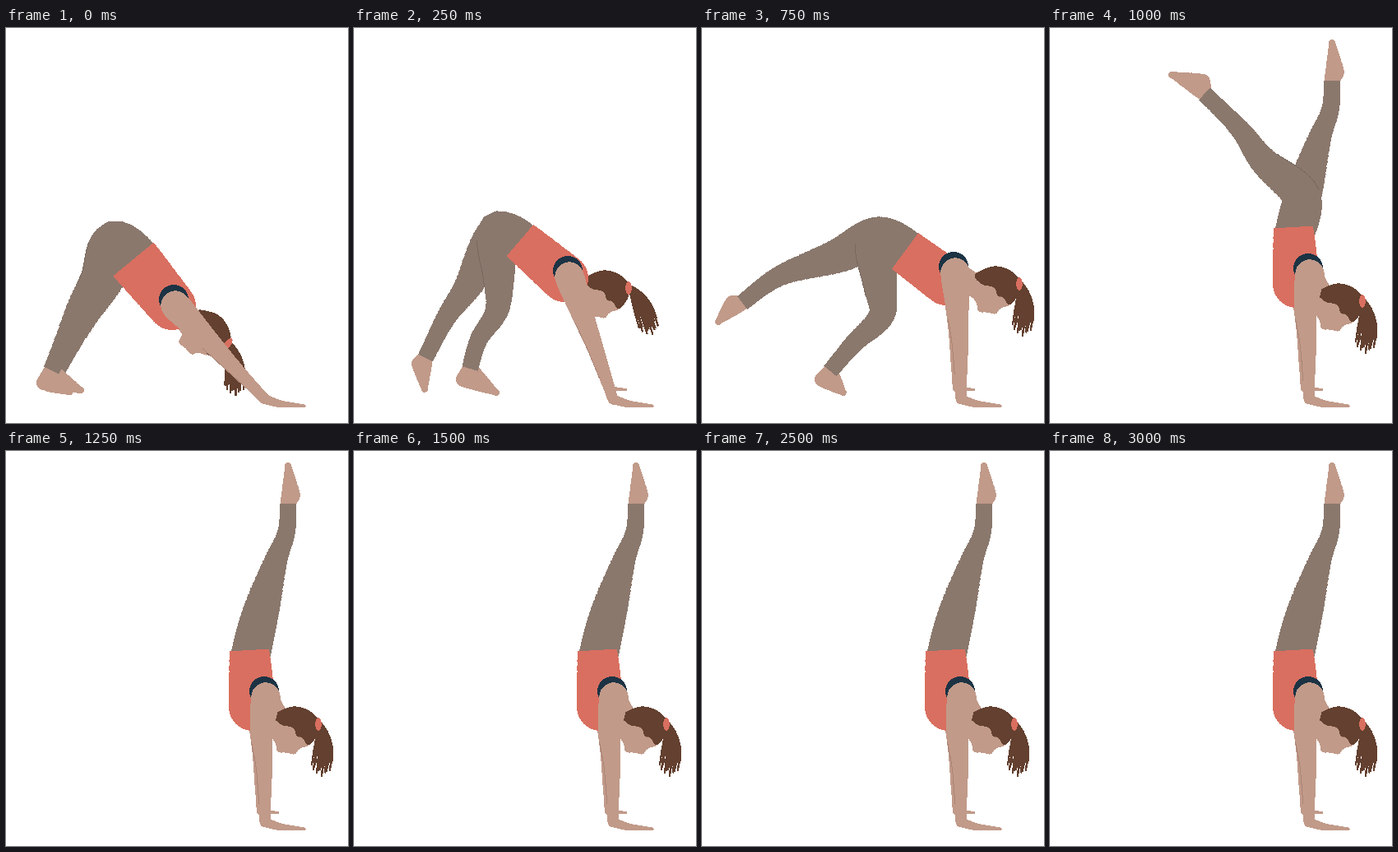
Animation, 416 px wide and 480 px high, one loop 3250 ms. Source, as an HTML page:

```html
<!DOCTYPE html>
<html lang="en">
<head>
<meta charset="utf-8">
<title>Kick up to handstand</title>
<style>
  html, body { margin: 0; width: 100%; height: 100%; overflow: hidden; background: #fff; }
  svg { display: block; width: 416px; height: 480px; shape-rendering: crispEdges; }
  .pose {
    visibility: hidden;
    animation: step 3250ms step-end infinite;
    animation-delay: calc(var(--slot) * 250ms - 3250ms);
  }
  .pose.hold { animation-name: hold; }
  @keyframes step { 0% { visibility: visible } 7.6923%, 100% { visibility: hidden } }
  @keyframes hold { 0% { visibility: visible } 61.5384%, 100% { visibility: hidden } }
</style>
</head>
<body>
<svg id="stage" viewBox="0 0 416 480"></svg>
<script>
const color = { pants: '#8a786d', skin: '#c19a89', top: '#d96f60', hair: '#63402f', band: '#1c3344',
                fold: '#78685e', crease: '#aa8475' };
const mix = (a, b, t) => a + (b - a) * t;
const between = (p, q, t) => [mix(p[0], q[0], t), mix(p[1], q[1], t)];
const add = (p, q) => [p[0] + q[0], p[1] + q[1]];
const disc = (name, [x, y], r) => `<circle cx="${x}" cy="${y}" r="${r}" fill="${color[name]}"/>`;
const stroke = (name, pts, width, cap = 'round') =>
  `<path d="M${pts.join('L')}" fill="none" stroke="${color[name]}" stroke-width="${width}" stroke-linecap="${cap}"/>`;

// Catmull-Rom samples { p, s }, where s is the share of the length travelled
function spline(joints) {
  const at = i => joints[Math.max(0, Math.min(joints.length - 1, i))];
  const pts = [joints[0]], perSpan = 10;
  for (let i = 0; i < joints.length - 1; i++) {
    const [a, b, c, d] = [at(i - 1), at(i), at(i + 1), at(i + 2)];
    for (let k = 1; k <= perSpan; k++) {
      const t = k / perSpan;
      pts.push([0, 1].map(j => b[j] + t / 2 * (c[j] - a[j]
        + t * (2 * a[j] - 5 * b[j] + 4 * c[j] - d[j] + t * (3 * (b[j] - c[j]) + d[j] - a[j])))));
    }
  }
  let length = 0;
  const run = pts.map((p, i) => length += i && Math.hypot(p[0] - pts[i - 1][0], p[1] - pts[i - 1][1]));
  return pts.map((p, i) => ({ p, s: run[i] / length }));
}

// Body part whose thickness follows width(s)
function tube(name, joints, width, cap = 'round') {
  const path = spline(joints);
  return path.slice(2).map((end, i) =>
    stroke(name, [path[i].p, path[i + 1].p, end.p], width(path[i + 1].s), cap)).join('');
}

// Thin line along the outer side of a tube
function edge(name, joints, width, from, to) {
  const path = spline(joints);
  const pts = path.flatMap(({ p, s }, i) => {
    if (!i || i === path.length - 1 || s < from || s > to) return [];
    const [a, b] = [path[i - 1].p, path[i + 1].p];
    const dx = b[0] - a[0], dy = b[1] - a[1], r = width(s) / 2 / Math.hypot(dx, dy);
    return [[p[0] - dy * r, p[1] + dx * r]];
  });
  return stroke(name, pts, 1);
}

const taper = (a, b) => s => mix(a, b, s);
const armWidth = s => 13 + 23 * (1 - s) ** 1.5;
const legWidth = waist => s => 20 + (waist - 20) * (1 - s) + 4 * Math.sin(2 * Math.PI * s);

const hand = ([x, y], size) => tube('skin',
  [[x, y], [x + size * .4, y + size * .12], [x + size, y + size * .17]], taper(size * .25, 3));

const foot = (ankle, heel, toe) =>
  tube('skin', [ankle, heel], taper(18, 18)) + tube('skin', [heel, toe], taper(18, 7))
  + tube('skin', [ankle, toe], taper(18, 6));

function leg({ joints, heel, toe }, start, waist, folded) {
  const path = [start, ...joints], width = legWidth(waist);
  return foot(joints[joints.length - 1], heel, toe) + tube('pants', path, width, 'butt')
    + (folded ? edge('fold', path, width, .22, .5) : '');
}

// Closed smooth outline: quadratic curves between midpoints
function blob(name, pts) {
  const mid = pts.map((p, i) => between(p, pts[(i + 1) % pts.length], .5));
  return `<path fill="${color[name]}" d="M${mid[mid.length - 1]}${pts.map((p, i) => `Q${p} ${mid[i]}`).join('')}Z"/>`;
}

// Ponytail and head hang from the hair tie at 0,0
const strands = 13;
const tail = Array.from({ length: strands }, (_, i) => {
  const u = i / (strands - 1);
  const tip = [mix(-8, 16, u), 50 + 9 * Math.sin(Math.PI * u) + 5 * Math.sin(i * 2.4)];
  return `<path d="M2 -3Q${mix(-4, 21, u)} 18 ${tip}" fill="none" stroke="${color.hair}" stroke-width="2.3"/>`;
}).join('');
const head = blob('skin', [[-60, -14], [-59, 14], [-51, 24], [-51, 35], [-38, 34], [-28, 38], [-24, 29],
    [-8, 26], [-14, 0]])
  + blob('hair', [[-57, -11], [-46, -17], [-30, -23], [-12, -18], [2, -6], [1, 12], [-13, 29],
    [-19, 15], [-27, 16], [-29, 3], [-46, 2]])
  + `<ellipse rx="3.8" ry="8" fill="${color.top}"/>`;
const place = ([x, y], turn, body) => `<g transform="translate(${x} ${y}) rotate(${turn})">${body}</g>`;

const wrist = [315, 451], farShift = [-4, -14];

function figure({ waist, size, chest, arm, tie, turn = 0, swing = 0, far, near, oneArm }) {
  const start = between(waist, chest, .15), shoulder = arm[0], reach = [...arm, wrist];
  const a = turn * Math.PI / 180, [c, s] = [Math.cos(a), Math.sin(a)];
  const face = add(tie, [-38 * c - 13 * s, 13 * c - 38 * s]);
  const farArm = reach.map(p => add(p, farShift));
  return (far ? leg(far, start, size) : '') + leg(near, start, size, far)
    + (oneArm ? '' : tube('skin', farArm.slice(1), taper(24, 12)) + hand(add(wrist, [-5, -15]), 21))
    + place(tie, swing, tail)
    + tube('skin', [shoulder, face], taper(28, 28)) + place(tie, turn, head)
    + disc('top', chest, 29) + tube('top', [chest, waist], taper(58, size), 'butt')
    + disc('band', add(shoulder, [-2, -7]), 18)
    + tube('skin', reach, armWidth) + hand(wrist, 48)
    + edge('crease', reach, armWidth, .35, .85);
}

const plantedArm = [[311, 345], [314, 385]];
const upright = { waist: [296, 242], size: 48, chest: [300, 311], arm: [[316, 299], ...plantedArm], tie: [380, 332] };
const raised = { joints: [[307, 207], [327, 137], [341, 99], [343, 64]], heel: [349, 54], toe: [343, 18] };

const poses = [
  // downward dog
  { waist: [155, 281], size: 64, chest: [202, 338], arm: [[206, 337], [240, 373], [281, 416]],
    tie: [270, 384], turn: 36, swing: -5, oneArm: true,
    far: { joints: [[133, 265], [118, 307], [95, 350], [61, 419]], heel: [52, 433], toe: [78, 442] },
    near: { joints: [[133, 265], [115, 305], [88, 347], [55, 416]], heel: [46, 431], toe: [91, 440] } },
  // weight shifts forward
  { waist: [202, 258], size: 50, chest: [256, 304], arm: [[262, 302], [279, 350], [294, 390]],
    tie: [334, 316], swing: -24,
    far: { joints: [[175, 250], [140, 312], [112, 352], [87, 401]], heel: [79, 408], toe: [86, 439] },
    near: { joints: [[175, 248], [176, 300], [174, 343], [152, 378], [141, 414]], heel: [133, 427], toe: [173, 443] } },
  // rear leg swings up
  { waist: [225, 265], size: 52, chest: [278, 307], arm: [[283, 299], [295, 345], [306, 390]],
    tie: [364, 316], swing: -8,
    far: { joints: [[192, 249], [125, 245], [85, 232], [41, 212]], heel: [30, 207], toe: [15, 192] },
    near: { joints: [[192, 249], [195, 300], [198, 345], [168, 384], [148, 415]], heel: [140, 428], toe: [177, 443] } },
  // leg drops to load the kick
  { waist: [247, 271], size: 54, chest: [297, 308], arm: [[308, 297], ...plantedArm], tie: [386, 311],
    far: { joints: [[215, 255], [165, 277], [95, 301], [49, 334]], heel: [37, 334], toe: [20, 357] },
    near: { joints: [[213, 257], [217, 315], [218, 350], [185, 383], [156, 417]], heel: [146, 427], toe: [172, 443] } },
  // split handstand
  { ...upright, far: raised,
    near: { joints: [[306, 205], [260, 162], [230, 122], [188, 80]], heel: [186, 65], toe: [148, 57] } },
  // handstand
  { ...upright, near: raised }
];

document.getElementById('stage').innerHTML = poses.map((pose, i) =>
  `<g class="pose${i === poses.length - 1 ? ' hold' : ''}" style="--slot:${i}">${figure(pose)}</g>`).join('');
</script>
</body>
</html>
```
